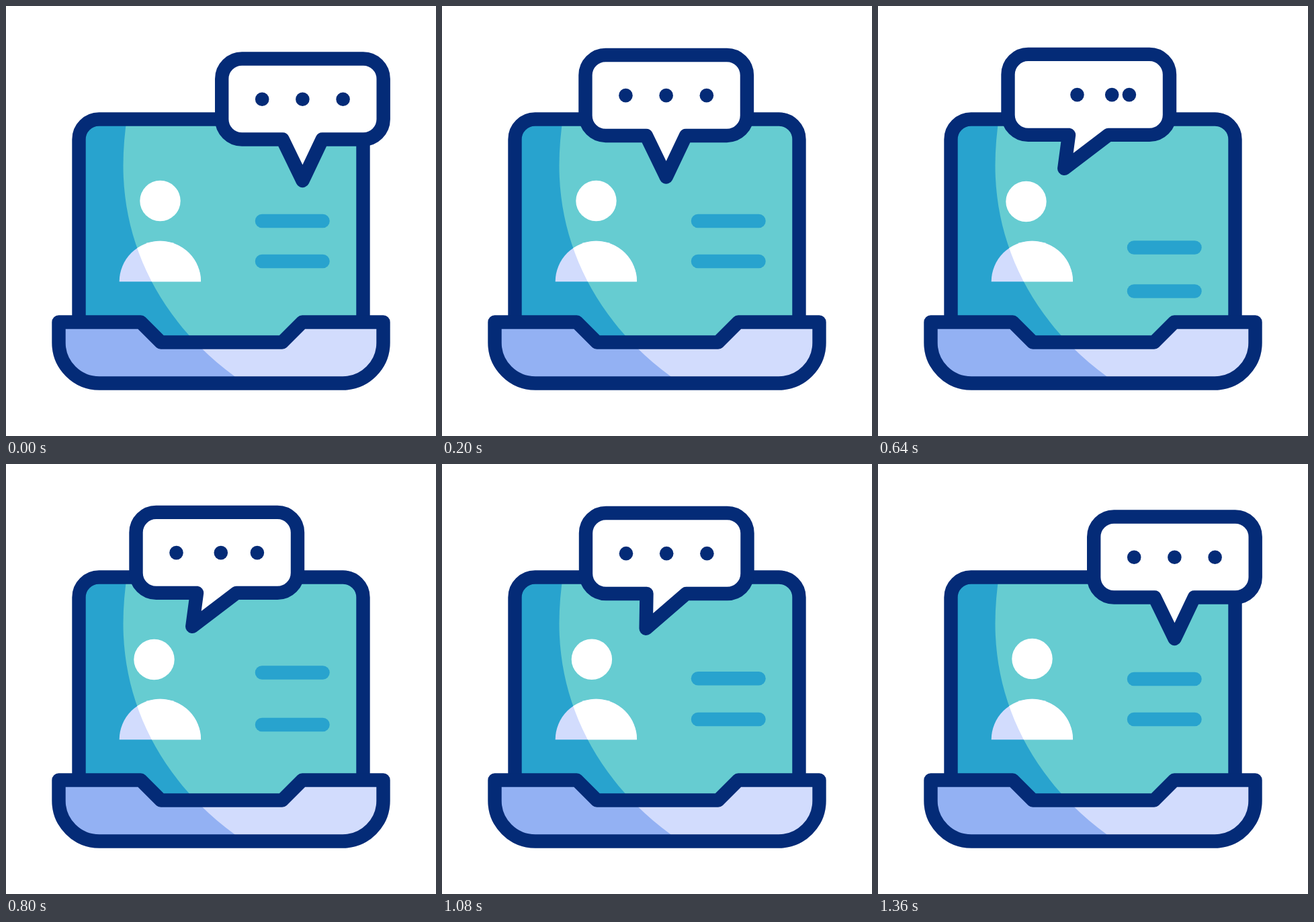
Animation, 640 px wide and 640 px high, one loop 1.48 s. Source, as an HTML page:

```html
<!DOCTYPE html>
<html lang="en">
<head>
<meta charset="utf-8">
<title>Laptop chat</title>
<style>
  html, body { margin: 0; height: 100%; overflow: hidden; background: #fff; }
  svg { display: block; width: 100vw; height: 100vh; }
  .ink { stroke: #042b77; stroke-width: 20.4; stroke-linejoin: round; }
  .row { stroke: #28a3ce; stroke-width: 20.5; stroke-linecap: round; }
  .dot { fill: #042b77; }
</style>
</head>
<body>
<svg viewBox="0 0 640 640">
  <defs>
    <clipPath id="lit">
      <path d="M181 160Q174.500 200 174.500 238C174.500 358 232 472 340 551L360 566H640V160Z"/>
    </clipPath>
    <rect id="screen" x="108.500" y="168.500" width="423" height="370" rx="30"/>
    <path id="base" d="M78.500 470.500h122l30 30h180.500l30-30h120.500v30.500a60.500 60.500 0 0 1-60.500 60.500h-362a60.500 60.500 0 0 1-60.500-60.500z"/>
    <path id="body" d="M168.700 410.300a60.700 60.500 0 0 1 121.400 0z"/>
  </defs>
  <use href="#screen" fill="#28a3ce"/>
  <use href="#screen" fill="#66ccd1" clip-path="url(#lit)"/>
  <use href="#screen" class="ink" fill="none"/>
  <use href="#body" fill="#d2dcfd"/>
  <use href="#body" fill="#fff" clip-path="url(#lit)"/>
  <circle id="head" cx="229.500" cy="290" r="30.200" fill="#fff"/>
  <path class="row" d="M381 320h90.500"/>
  <path class="row" d="M381 380h90.500"/>
  <use href="#base" fill="#93b1f3"/>
  <use href="#base" fill="#d2dcfd" clip-path="url(#lit)"/>
  <use href="#base" class="ink" fill="none"/>
  <g id="bubble">
    <path id="outline" class="ink" fill="#fff"/>
    <circle class="dot" cx="381.200" cy="138.700" r="10.300"/>
    <circle class="dot" cx="441.400" cy="138.700" r="10.300"/>
    <circle class="dot" cx="501.600" cy="138.700" r="10.300"/>
  </g>
</svg>
<script>
const LOOP = 1480;
const LEAVE = 1013;  // when the bubble heads back
const TRAVEL = 268;
const $ = id => document.getElementById(id);
const rows = document.querySelectorAll('.row');
const dots = document.querySelectorAll('.dot');

function ease(u) {
  u = Math.min(1, Math.max(0, u));
  return u * u * (3 - 2 * u);
}

// Rises from 0 to 1 at `start`, falls back to 0 at `end`.
function pulse(t, start, rise, end, fall) {
  return ease((t - start) / rise) - ease((t - end) / fall);
}

function move(el, x, y) {
  el.setAttribute('transform', `translate(${x} ${y})`);
}

function draw(t) {
  const slide = pulse(t, 0, TRAVEL, LEAVE, TRAVEL);
  const bend = pulse(t, 200, 200, LEAVE, TRAVEL);
  const nod = pulse(t, 200, 200, LEAVE, 200);
  const first = pulse(t, 360, 200, 560, 220);
  const second = pulse(t, 440, 200, 640, 220);
  const rebound = pulse(t, 640, 160, 800, 340);

  move($('bubble'), -127.7 * slide, -6.6 * slide);
  $('outline').setAttribute('d',
    `M351.2 78.5h180.500a30 30 0 0 1 30 30v60a30 30 0 0 1-30 30h-61` +
    `L${441.5 - 36.5 * bend} ${260 - 11.5 * bend}L411.700 198.500h-60.500` +
    `a30 30 0 0 1-30-30v-60a30 30 0 0 1 30-30z`);
  move($('head'), -9 * nod, nod);
  move(rows[0], 0, 57 * first - 9.5 * rebound);
  move(rows[1], 0, 44.5 * second);
  move(dots[0], 62 * first, 0);
  move(dots[1], 34.5 * second, 0);
}

function tick() {
  draw(performance.now() % LOOP);
  requestAnimationFrame(tick);
}
tick();
</script>
</body>
</html>
```
